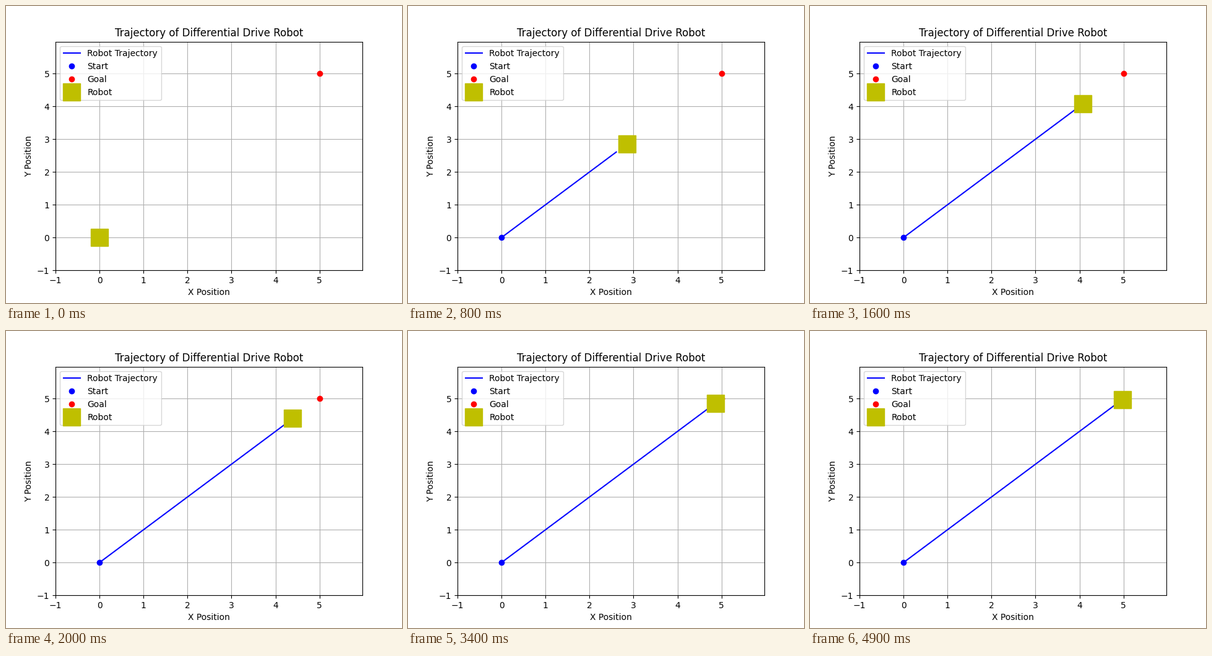
A matplotlib script that plays this animation: 640 px wide and 480 px high, repeating every 5100 ms.

```python
import matplotlib.pyplot as plt
import numpy as np
from matplotlib.animation import FuncAnimation

GOAL = 5
STEPS = 51
INTERVAL = 100

# The robot closes a tenth of the remaining distance at every step.
path = GOAL * (1 - 0.9 ** np.arange(STEPS))

fig, ax = plt.subplots(figsize=(6.4, 4.8), dpi=100)
ax.set_xlim(-1, path[-1] + 1)
ax.set_ylim(-1, path[-1] + 1)
ax.set_title("Trajectory of Differential Drive Robot")
ax.set_xlabel("X Position")
ax.set_ylabel("Y Position")
ax.grid(True)

trail, = ax.plot([], [], "b-", label="Robot Trajectory")
ax.plot(0, 0, "bo", label="Start")
ax.plot(GOAL, GOAL, "ro", label="Goal")
robot, = ax.plot([], [], "ys", markersize=20, label="Robot")
ax.legend(loc="upper left")


def update(step):
    # The trail ends one step behind the robot.
    trail.set_data(path[:step], path[:step])
    robot.set_data([path[step]], [path[step]])
    return trail, robot


anim = FuncAnimation(fig, update, frames=STEPS, interval=INTERVAL,
                     init_func=lambda: update(0), repeat=True, repeat_delay=0)
plt.show()
```
